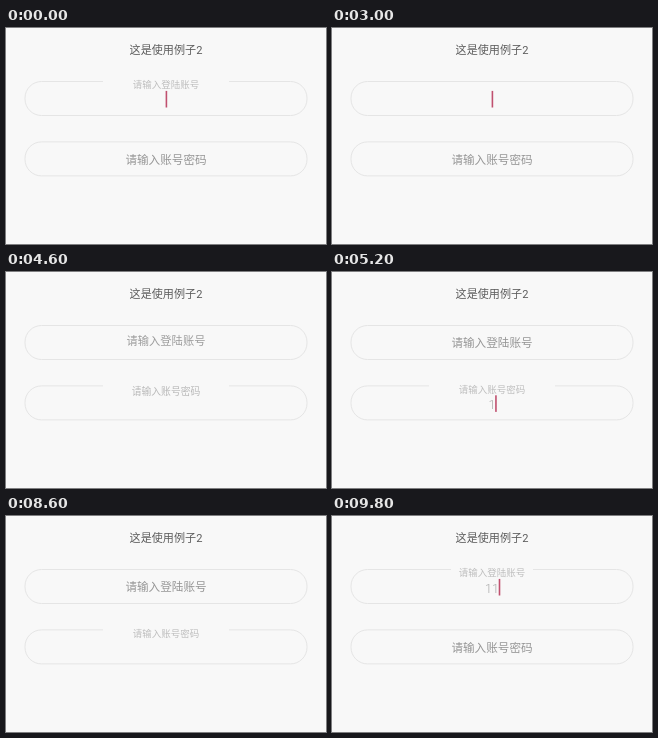
Write an HTML page that moves like this. It is 320 by 216 pixels and loops after 10000 ms.

```html
<!DOCTYPE html>
<html lang="zh">
<head>
<meta charset="utf-8">
<style>
  html, body { margin: 0; width: 100%; height: 100%; overflow: hidden; background: #f8f8f8; }
  svg { display: block; width: 320px; height: 216px; }
  text { text-anchor: middle; font-family: "Noto Sans CJK SC", "Noto Sans CJK", sans-serif; }
  .title { font-size: 11.1px; fill: #5c5c5c; }
  .title tspan, .value { font-family: Roboto, sans-serif; }
  .value { font-size: 12.5px; font-weight: 300; fill: #aaa; }
  .border { fill: none; stroke: #e5e5e5; stroke-width: 1; }
</style>
</head>
<body>
<svg viewBox="0 0 320 216">
  <text class="title" x="160" y="26">这是使用例子<tspan>2</tspan></text>
</svg>
<script>
const LOOP = 10000;
const CENTER = 160;
const svg = document.querySelector('svg');

// Each step lists only what changes; focus 0 = account, 1 = password.
const steps = [
  [0, { focus: 0, text: '', caret: true, label: true, shift: 0, pressed: false, gap: 63 }],
  [400, { text: '1' }],
  [1000, { text: '111', label: false }],
  [1400, { caret: false }],
  [1800, { caret: true }],
  [2200, { text: '11' }],
  [2600, { text: '1' }],
  [3000, { text: '' }],
  [3800, { label: true, caret: false }],
  [4000, { caret: true }],
  [4200, { pressed: true }],
  [4400, { pressed: false, caret: false, focus: 1, shift: 0.35 }],
  [4600, { shift: 0.85 }],
  [4800, { shift: 1 }],
  [5000, { caret: true }],
  [5200, { text: '1' }],
  [5800, { text: '•1' }],
  [6000, { text: '••1', label: false }],
  [6200, { text: '•••1' }],
  [6600, { caret: false }],
  [7000, { text: '•••', caret: true }],
  [7400, { text: '••' }],
  [7600, { text: '•' }],
  [8000, { text: '' }],
  [8600, { label: true, caret: false }],
  [8800, { pressed: true }],
  [9000, { pressed: false, focus: 0, shift: 0.5, gap: 41 }],
  [9200, { shift: 0, caret: true }],
  [9400, { text: '1' }],
  [9800, { text: '11' }]
];

function add(parent, tag, attrs) {
  const node = document.createElementNS('http://www.w3.org/2000/svg', tag);
  set(node, attrs);
  parent.append(node);
  return node;
}

function set(node, attrs) {
  for (const name in attrs) node.setAttribute(name, attrs[name]);
}

function makeField(top, caption) {
  const group = add(svg, 'g', { transform: `translate(0 ${top})` });
  const field = {
    border: add(group, 'path', { class: 'border' }),
    label: add(group, 'text', { x: CENTER }),
    value: add(group, 'text', { class: 'value', y: 23.2 }),
    caret: add(group, 'rect', { y: 9.4, width: 1.6, height: 16.6 })
  };
  field.label.textContent = caption;
  return field;
}

const fields = [makeField(53.5, '请输入登陆账号'), makeField(113.9, '请输入账号密码')];

function borderPath(gap) {
  return `M${CENTER + gap} 0H284.5a16.5 16.5 0 0 1 16.5 16.5v1a16.5 16.5 0 0 1 -16.5 16.5` +
    `H35.5a16.5 16.5 0 0 1 -16.5 -16.5v-1a16.5 16.5 0 0 1 16.5 -16.5H${CENTER - gap}`;
}

function drawField(field, index, state) {
  const active = state.focus === index;
  const lift = index ? state.shift : 1 - state.shift;
  const size = 11.6 - 2.1 * lift;
  const grey = state.pressed && !active ? 98 : Math.round(150 + 40 * lift);
  const shown = state.label || !active;
  const text = active ? state.text : '';
  const count = text.length;

  set(field.border, { d: borderPath(shown && lift >= 0.5 ? state.gap : 0) });
  set(field.label, {
    y: 17.3 - 14 * lift + 0.38 * size,
    'font-size': size,
    fill: `rgb(${grey},${grey},${grey})`,
    visibility: shown ? 'visible' : 'hidden'
  });
  set(field.value, { x: [...text].map((_, i) => CENTER + 7 * (i - (count - 1) / 2)).join(' ') });
  field.value.textContent = text;
  set(field.caret, {
    x: 159.6 + 3.55 * count,
    fill: text.includes('•') ? '#e84f80' : '#c0506f',
    visibility: active && state.caret ? 'visible' : 'hidden'
  });
}

function draw(now) {
  const time = now % LOOP;
  const state = {};
  for (const [start, change] of steps) {
    if (start <= time) Object.assign(state, change);
  }
  fields.forEach((field, index) => drawField(field, index, state));
}

const begin = performance.now();
function tick() {
  draw(performance.now() - begin);
  requestAnimationFrame(tick);
}
tick();
</script>
</body>
</html>
```
